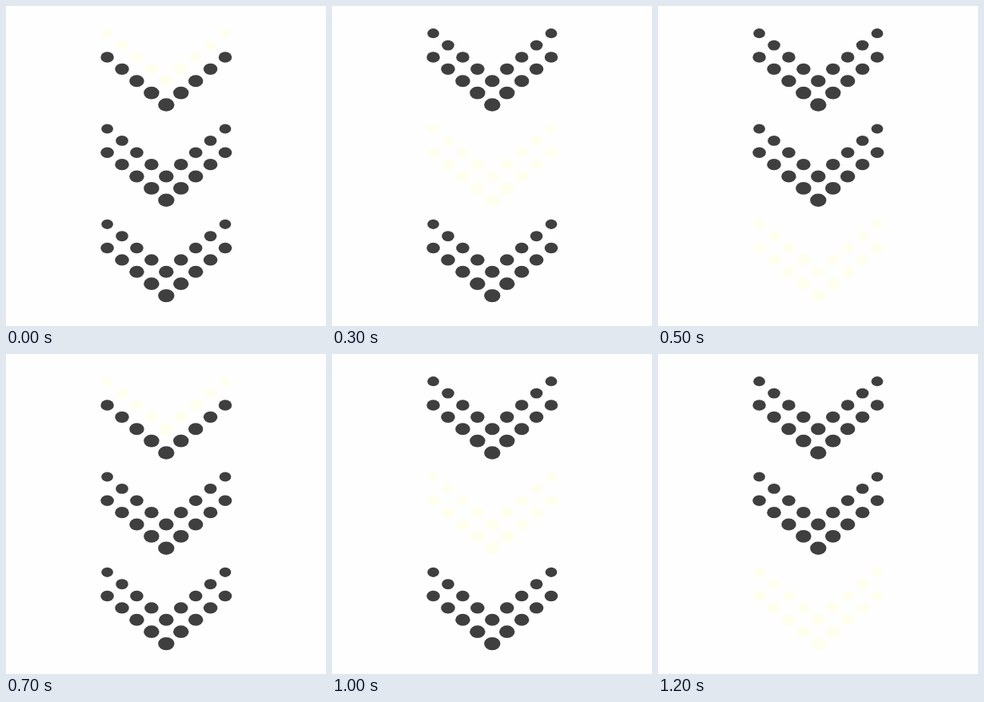
These frames come from a looping animation (400 by 400 pixels, 1400 ms). An HTML page:

```html
<!DOCTYPE html>
<html lang="en">
<head>
<meta charset="utf-8">
<title>Dotted arrows</title>
<style>
html, body { margin: 0; width: 100%; height: 100%; overflow: hidden; background: #fefefe; }
svg { display: block; width: 100%; height: 100%; }
</style>
</head>
<body>
<svg viewBox="0 0 400 400"></svg>
<script>
const NS = "http://www.w3.org/2000/svg";
const svg = document.querySelector("svg");
const DARK = "#403f40", LIGHT = "#fffff0";
const STEP = 100, PERIOD = 700;

// Each arrow is two V-shaped rows; dots grow towards the tip.
function makeRow(row) {
  const g = document.createElementNS(NS, "g");
  const arrow = row >> 1, lower = row % 2;
  for (let col = -4; col <= 4; col++) {
    const depth = 4 - Math.abs(col) + 2 * lower;
    const dot = document.createElementNS(NS, "ellipse");
    dot.setAttribute("cx", 200.3 + col * 18.43);
    dot.setAttribute("cy", 34.2 + arrow * 119.3 + depth * 14.88);
    dot.setAttribute("rx", 7.35 + depth * 0.47);
    dot.setAttribute("ry", 6.1 + depth * 0.35);
    g.append(dot);
  }
  svg.append(g);
  return g;
}

const rows = Array.from({ length: 6 }, (_, row) => makeRow(row));
const start = performance.now();

function draw() {
  const t = (performance.now() - start) % PERIOD;
  const lead = Math.min(Math.floor(t / STEP), 5);
  rows.forEach((g, row) => {
    const lit = row === lead || row === lead - 1;
    g.setAttribute("fill", lit ? LIGHT : DARK);
  });
  requestAnimationFrame(draw);
}
draw();
</script>
</body>
</html>
```
